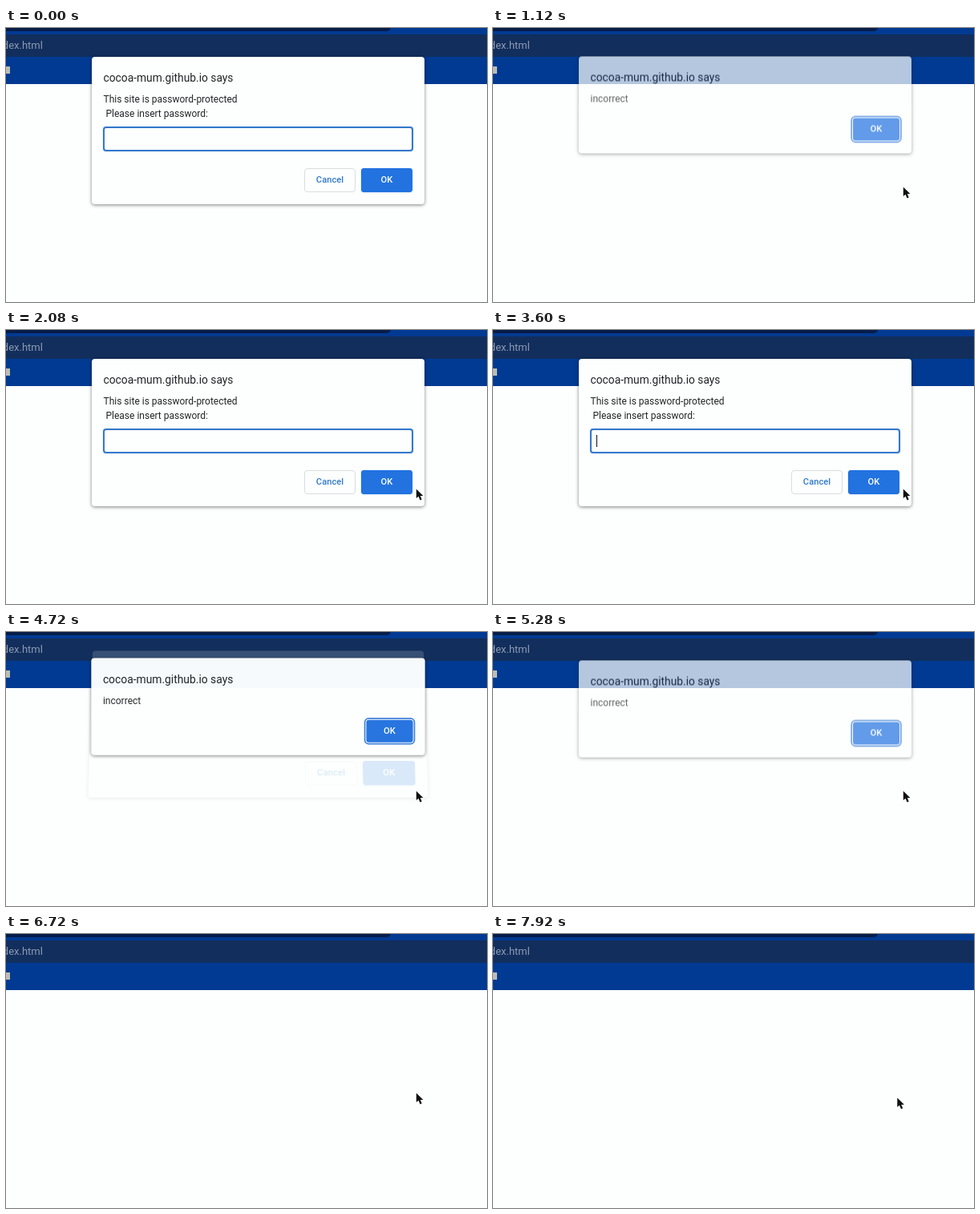
Write an HTML page that moves like this. It is 600x342 px and loops after 8000 ms.

```html
<!DOCTYPE html>
<html lang="en">
<head>
<meta charset="utf-8">
<title>Password prompt</title>
<style>
html, body { margin: 0; width: 100%; height: 100%; overflow: hidden; background: #fdfffe; }
body, #stage, #stage * { box-sizing: border-box; }
#stage { position: relative; width: 600px; height: 342px; overflow: hidden; font: 12px/18px Roboto, sans-serif; color: #222427; }
#stage div, svg { position: absolute; }
.bar { left: 0; width: 600px; }
.dialog { left: 107px; top: 36px; width: 415px; border-radius: 4px; background: #fdfffe; box-shadow: 0 1px 4px rgba(0,0,0,.5); }
.title { left: 14.5px; top: 15.5px; font-size: 13.8px; line-height: 20px; white-space: pre; }
.body { left: 14.5px; top: 44px; white-space: pre; }
.field { left: 14px; top: 87px; width: 387px; height: 31px; border: 2px solid #3478cc; border-radius: 4px; box-shadow: 0 0 1px #3478cc; padding-left: 6px; line-height: 27px; }
.caret { top: 6px; width: 1px; height: 15px; background: #111; }
.button { height: 30px; width: 64px; border-radius: 4px; font-size: 11.2px; font-weight: 500; line-height: 30px; text-align: center; color: #fdfffe; background: #2272e0; }
.ok { left: 336px; top: 139px; box-shadow: 0 0 1px #2272e0; }
.cancel { left: 265px; top: 139px; line-height: 28px; border: 1px solid #d9dce1; color: #2f78c9; background: none; }
.focus { left: 342px; top: 77px; width: 58px; height: 28px; line-height: 28px; border-radius: 3px; box-shadow: 0 0 0 1px #fdfffe, 0 0 0 2.7px #3a7fd8; }
</style>
</head>
<body>
<div id="stage">
  <div class="bar" style="top:0;height:70px;background:#003a92"></div>
  <div style="left:-10px;top:-10px;width:490px;height:14px;border-radius:5px;background:#071d48"></div>
  <div class="bar" style="top:8px;height:28px;background:#122e5c"></div>
  <div style="left:-4.2px;top:11.5px;font-size:13px;line-height:20px;color:#8d9bb3">dex.html</div>
  <div style="left:0;top:48px;width:5px;height:9px;background:#bcbdb6"></div>

  <div class="dialog" id="alert" style="height:121px">
    <div class="title">cocoa-mum.github.io says</div>
    <div class="body">incorrect</div>
    <div class="button focus">OK</div>
  </div>
  <div class="dialog" id="prompt" style="height:184px">
    <div class="title">cocoa-mum.github.io says</div>
    <div class="body">This site is password-protected
 Please insert password:</div>
    <div class="field"><span id="value"></span><div class="caret" id="caret"></div></div>
    <div class="button cancel">Cancel</div>
    <div class="button ok">OK</div>
  </div>

  <svg id="cursor" width="16" height="22" style="left:0;top:0;overflow:visible">
    <path d="M0 0V11.7L2.7 9.3L4.8 14L6.9 13L5 8.5H8.6Z" fill="#111" stroke="#fff" paint-order="stroke"/>
  </svg>
</div>
<script>
const LOOP = 8000, FADE = 180;
const [alertBox, promptBox, value, caret, cursor] =
  ["alert", "prompt", "value", "caret", "cursor"].map(id => document.getElementById(id));

// [opens, closes]
const promptTimes = [[-900, 170], [1150, 4570], [5310, 6430]];
const alertTimes = [[170, 1070], [4570, 5230]];
const typed = [
  { from: 3800, to: 5000, text: "1111", keys: [3830, 4000, 4240, 4480] },
  { from: 5600, to: 6700, text: "1234", keys: [5680, 5840, 6080, 6320] }
];

const clamp = x => Math.max(0, Math.min(1, x));
const span = (t, start, length) => clamp((t - start) / length);

// A dialog drops in from above, and tilts away upwards as it closes.
function glide(box, times, t) {
  const life = times.find(([open, close]) => t >= open && t < close + FADE);
  box.style.display = life ? "" : "none";
  if (!life) return;
  const away = 1 - span(t, life[0], FADE), out = span(t, life[1], FADE), k = out ** 3;
  box.style.opacity = out ? 1 - out : 1 - away * away;
  box.style.zIndex = out ? 1 : 2;
  box.style.transform = out
    ? `perspective(1000px) translateY(${-24 * k}px) scale(${1 + .014 * k}) rotateX(${14 * k}deg)`
    : away ? `translateY(${-21 * away}px) scale(${1 + .02 * away})` : "none";
}

function type(t) {
  const entry = typed.find(e => t >= e.from && t < e.to);
  const count = entry ? entry.keys.filter(k => t >= k).length : 0;
  value.textContent = entry ? entry.text.slice(0, count) : "";
  caret.style.left = 6 + value.offsetWidth + "px";
  const blink = t > 1000 && (t % 1000 >= 600 || t % 1000 < 40);
  caret.style.display = count || blink ? "" : "none";
}

function point(t) {
  const enter = 1 - (1 - span(t, 640, 380)) ** 2;
  const leave = span(t, 7620, 300);
  const x = 602 - 90.2 * enter - 7.5 * leave;
  const y = 207 - 8.6 * enter + 6 * leave;
  cursor.style.transform = `translate(${x}px,${y}px)`;
  cursor.style.zIndex = 3;
}

function draw(now) {
  const t = now % LOOP;
  glide(alertBox, alertTimes, t);
  glide(promptBox, promptTimes, t);
  type(t);
  point(t);
}

const start = performance.now();
function tick() {
  draw(performance.now() - start);
  requestAnimationFrame(tick);
}
tick();
</script>
</body>
</html>
```
